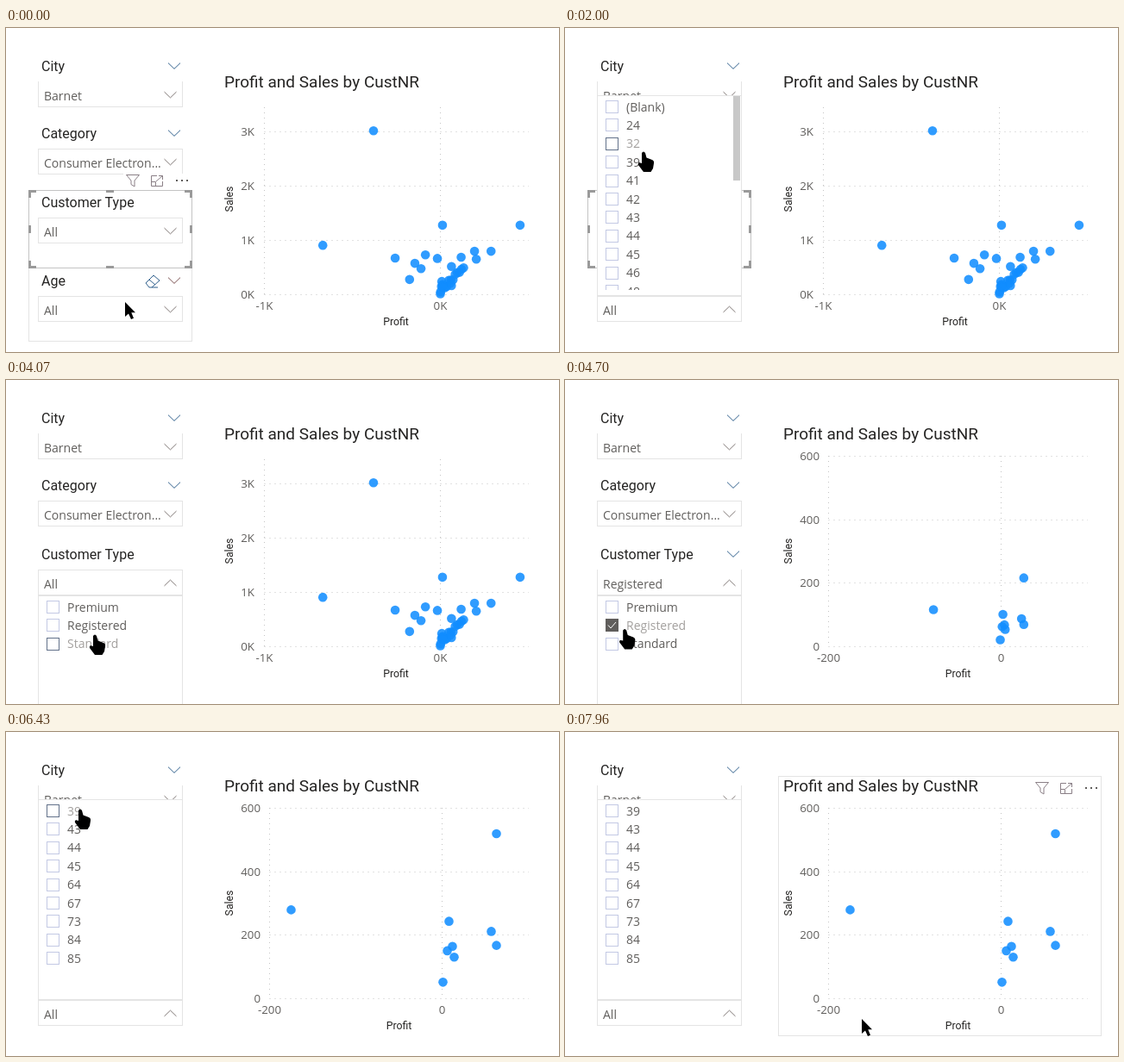
Recreate the animation shown at these times as an HTML page with a canvas. Size 641 by 376 pixels, loop 8000 ms.

```html
<!DOCTYPE html>
<html lang="en">
<head>
<meta charset="utf-8">
<title>Scatter chart with slicers</title>
<style>
html, body { margin: 0; width: 100%; height: 100%; overflow: hidden; background: #fff; }
canvas { display: block; }
</style>
</head>
<body>
<canvas id="stage" width="641" height="376"></canvas>
<script>
const c = document.getElementById('stage').getContext('2d');
const LOOP = 8000, SWITCH = 4600;
const UI = '14px "Open Sans", sans-serif';
const AXIS = '13.3px "Open Sans", sans-serif';
const HEAD = '16px Roboto, sans-serif';
const TITLE = '19px Roboto, sans-serif';
const SMALL = '12.3px Roboto, sans-serif';
const INK = '#252423', GREY = '#605e5c', LINE = '#e4e4e4', GRID = '#c4c4c4', BLUE = '#118dff', LINK = '#2f5f8c';
const ROW = 21.4;

const mix = (a, b, k) => a + (b - a) * k;
const ease = k => k * k * (3 - 2 * k);
const span = (t, from, to) => ease(Math.max(0, Math.min(1, (t - from) / (to - from))));
const inside = (p, x, y, r, b) => p.x > x && p.x < r && p.y > y && p.y < b;

// Pointer moves: from, to, x, y
const moves = [
  [80, 270, 133, 291], [270, 540, 123, 320],
  [1300, 1960, 91, 144], [2090, 2540, 1, 240], [2540, 2810, 6, 267],
  [3000, 3440, 104, 240], [3740, 4060, 103, 296], [4200, 4340, 102, 282], [4500, 4950, 24, 300],
  [5260, 5420, 112, 320], [5900, 6420, 86, 90], [6520, 7510, 76, 264], [7700, 7950, 344, 333]
];

function pointer(t) {
  const p = { x: 138, y: 318 };
  for (const [from, to, x, y] of moves) {
    const k = span(t, from, to);
    p.x = mix(p.x, x, k);
    p.y = mix(p.y, y, k);
  }
  return p;
}

// Customers as profit, sales
const kept = [[-175, 280], [63, 520], [57, 212], [63, 168], [8, 244], [12, 165], [6, 151], [14, 131], [1, 52]];
const others = [
  [-380, 3020], [-668, 910], [-257, 675], [-145, 578], [-110, 480], [-85, 735], [-17, 668],
  [12, 1280], [453, 1280], [194, 802], [288, 800], [118, 690], [204, 655]
];
let seed = 7;
const random = () => (seed = seed * 16807 % 2147483647) / 2147483647;
for (let i = 0; i < 12; i++) others.push([i * 12, 90 + i * 35 + (random() - .5) * 150]);

const wide = { x0: 503.5, kx: .204, ky: .063, min: -1000, step: 1000, rows: 3, unit: 1000, suffix: 'K', top: 92, mid: 452, edge: 288 };
const near = { x0: 505.5, kx: 1, ky: .3683, min: -200, step: 200, rows: 3, unit: 1, suffix: '', top: 88, mid: 455.5, edge: 295 };
const atX = (s, v) => s.x0 + v * s.kx;
const atY = (s, v) => 309.5 - v * s.ky;

const types = ['Premium', 'Registered', 'Standard'];
const ages = ['(Blank)', 24, 32, 39, 41, 42, 43, 44, 45, 46, 48];
const fewAges = [39, 43, 44, 45, 64, 67, 73, 84, 85];

const shapes = {
  arrow: 'M0 0V17L4 13.5 7 20 10 18.7 7.3 12.3H12Z',
  hand: 'M-2 1Q0-2 2 1L3.5 6.5 10 9Q12.5 10 12 13L11 19 8.5 23H0L-6 15Q-7 11-2 13Z',
  funnel: 'M-7.5-6.5H7.5L2 0V7L-2 4.5V0Z',
  focus: 'M0-5.5H-6.5V6.5H6.5V1M-1 1L6.5-5.5M2-5.5H6.5V-1M-6.5 1.5H-1.5V6.5',
  eraser: 'M-8 2L1-7 8-1-1 7H-4ZM-4-2L3 4M-1 7H6',
  down: 'M-7-3.4L0 3.4 7-3.4',
  up: 'M-7 3.4L0-3.4 7 3.4',
  tick: 'M3 7.5L6 11 12 4'
};

function shape(name, x, y, color, filled) {
  const path = new Path2D(shapes[name]);
  c.save();
  c.translate(x, y);
  c.fillStyle = c.strokeStyle = color;
  c.lineWidth = 1;
  filled ? c.fill(path) : c.stroke(path);
  c.restore();
}

function text(s, x, y, font, color = GREY, align = 'left') {
  c.font = font;
  c.fillStyle = color;
  c.textAlign = align;
  c.fillText(s, x, y);
}

function line(x1, y1, x2, y2, color) {
  c.strokeStyle = color;
  c.lineWidth = 1;
  c.beginPath();
  c.moveTo(x1, y1);
  c.lineTo(x2, y2);
  c.stroke();
}

function box(x, y, w, h, color) {
  c.fillStyle = color;
  c.fillRect(x, y, w, h);
}

function frame(x, y, w, h, color = LINE) {
  c.strokeStyle = color;
  c.lineWidth = 1;
  c.strokeRect(x + .5, y + .5, w, h);
}

function icons(x, y) {
  shape('funnel', x, y, '#8a7f86');
  shape('focus', x + 28, y, '#8a7f86');
  for (let i = 0; i < 3; i++) box(x + 50 + i * 6, y - 1, 2, 2, GREY);
}

function slicer(name, value, y, { filtered, hover, up, topless }) {
  text(name, 41, y - 12, HEAD, INK);
  if (filtered || hover) shape('down', 195, y - 18, filtered ? LINK : '#7a4f4f');
  if (hover) shape('eraser', 170, y - 17, LINK);
  frame(37, y, 167, 29);
  if (topless) box(38, y, 166, 1, '#fff');
  text(value, 44, y + 22, UI);
  shape(up ? 'up' : 'down', 190.5, y + 15.5, '#7d7573');
}

function selection() {
  frame(26, 188, 189, 90, GRID);
  const color = '#9a9a9a';
  for (const x of [26, 213]) {
    for (const y of [188, 229, 270]) box(x, y, 3, 9, color);
  }
  for (const y of [188, 276]) {
    for (const x of [26, 116, 207]) box(x, y, 9, 3, color);
  }
}

function popup(top, bottom, items, p, checked) {
  box(37, top, 168, bottom - top, '#fff');
  frame(37, top, 167, bottom - top);
  c.save();
  c.beginPath();
  c.rect(38, top, 166, bottom - top - 6);
  c.clip();
  const over = inside(p, 38, top, 204, bottom) ? Math.floor((p.y - top - 2.3) / ROW) : -1;
  items.forEach((item, i) => {
    const y = top + 13.5 + i * ROW, by = Math.round(y - 7.6), hot = i === over;
    if (i === checked) {
      box(47, by, 15, 15, GREY);
      shape('tick', 47, by, '#fff');
    } else frame(47, by, 14, 14, hot ? '#62718a' : '#c3c9e4');
    text(item, 71, y + 5, UI, hot ? '#a3a09e' : GREY);
  });
  if (items.length > 10) box(195, top + 1, 8, 98, '#c8c8c8');
  c.restore();
}

function dot(x, y) {
  c.beginPath();
  c.arc(x, y, 5.3, 0, 7);
  c.fill();
}

function chart(t, hover) {
  const s = t < SWITCH ? wide : near;
  const k = span(t, SWITCH, SWITCH + 280);
  const label = v => v / s.unit + s.suffix;
  if (hover) {
    frame(247, 51, 374, 301);
    icons(553, 65);
  }
  text('Profit and Sales by CustNR', 253, 69, TITLE, INK);

  c.setLineDash([1, 5]);
  for (const v of [s.min, 0]) {
    line(atX(s, v), s.top, atX(s, v), 309, GRID);
    text(label(v), atX(s, v), 327, AXIS, GREY, 'center');
  }
  for (let i = 0; i <= s.rows; i++) {
    const v = i * s.step, y = Math.floor(atY(s, v)) + .5;
    line(atX(s, s.min), y, 606, y, GRID);
    text(label(v), s.edge, y + 4.5, AXIS, GREY, 'right');
  }
  c.setLineDash([]);

  text('Profit', s.mid, 345, SMALL, INK, 'center');
  c.save();
  c.translate(263, 198.5);
  c.rotate(-Math.PI / 2);
  text('Sales', 0, 0, SMALL, INK, 'center');
  c.restore();

  c.fillStyle = BLUE;
  c.globalAlpha = .87;
  if (t < SWITCH) for (const [u, v] of others) dot(atX(wide, u), atY(wide, v));
  for (const [u, v] of kept) {
    dot(mix(atX(wide, u), atX(near, u), k), mix(atY(wide, v), atY(near, v), k));
  }
  c.globalAlpha = 1;
}

function draw(t) {
  const p = pointer(t);
  const selected = t < 2990;
  const ageOpen = t >= 910 && t < 2990 || t >= 5700;
  const typeOpen = t >= 3620 && t < 4900;
  const chosen = t >= 4340;
  const inList = ageOpen && inside(p, 38, 79, 204, 310) || typeOpen && inside(p, 38, 251, 204, 376);
  const overType = !inList && !selected && inside(p, 26, 188, 216, 278);
  const overAge = !inList && inside(p, 26, 278, 216, 364);

  box(0, 0, 641, 376, '#fff');
  chart(t, inside(p, 247, 51, 622, 353));

  if (overAge) frame(26, 278, 189, 85);
  if (overAge && !selected) icons(147, 268);
  if (overType) frame(26, 188, 189, 90);
  slicer('City', 'Barnet', 62, { filtered: true, topless: true });
  slicer('Category', 'Consumer Electron...', 140, { filtered: true });
  if (selected) selection();
  if (!ageOpen && (selected || overType)) {
    box(136, 169, 78, 17, '#fff');
    icons(147, 177);
  }
  slicer('Customer Type', chosen ? 'Registered' : 'All', 220,
    { filtered: chosen, hover: overType, up: typeOpen, topless: chosen });
  slicer('Age', 'All', 311, { hover: overAge, up: ageOpen });
  if (ageOpen) popup(78, 310, t < SWITCH ? ages : fewAges, p);
  if (typeOpen) popup(250, 390, types, p, chosen ? 1 : -1);
  shape(inList ? 'hand' : 'arrow', p.x, p.y, '#000', true);
}

const start = performance.now();
function tick() {
  draw((performance.now() - start) % LOOP);
  requestAnimationFrame(tick);
}
tick();
</script>
</body>
</html>
```
